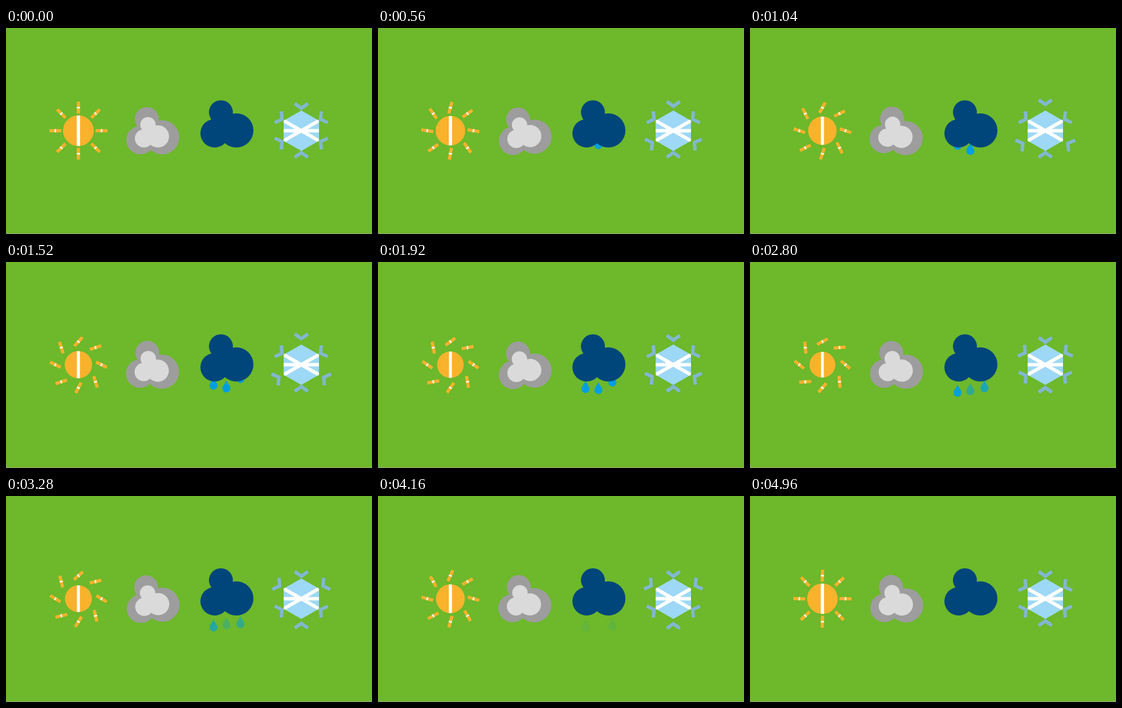
An HTML page that plays this animation: 642 px wide and 362 px high, repeating every 5.04 s.

```html
<!DOCTYPE html>
<html lang="en">
<head>
<meta charset="utf-8">
<title>Weather icons</title>
<style>
  html, body { margin: 0; width: 100%; height: 100%; overflow: hidden; background: #6db82b; }
  svg { display: block; width: 100%; height: 100%; }
</style>
</head>
<body>
<svg viewBox="0 0 642 362">
  <defs>
    <clipPath id="disc"><circle r="27"/></clipPath>
    <clipPath id="hex"><path d="M0-35.5 31-17.8V17.8L0 35.5-31 17.8V-17.8Z"/></clipPath>
    <g id="ray">
      <rect x="-2.75" y="-10.5" width="5.5" height="21" fill="#f9b22c"/>
      <rect x="-2.75" y="-1.3" width="5.5" height="2.6" fill="#fff"/>
    </g>
    <g id="cloud">
      <circle cx="377" cy="148" r="21"/>
      <circle cx="366" cy="185" r="25"/>
      <circle cx="404" cy="180" r="30"/>
    </g>
    <path id="drop" d="M0-21C2-16 7-11.5 7-7A7 7 0 0 1-7-7C-7-11.5-2-16 0-21Z" fill="#009fe0"/>
    <path id="chevron" d="M-11.5-47.2 0-39 11.5-47.2" fill="none" stroke="#82b7d0" stroke-width="6"/>
  </defs>

  <rect width="642" height="362" fill="#6db82b"/>
  <rect y="361" width="642" height="1" fill="#96a588"/>

  <g id="rays" transform="translate(127 180.5)"></g>
  <g id="sun">
    <circle r="27" fill="#f9b22c"/>
    <rect x="-2.9" y="-27" width="5.8" height="54" fill="#fff" clip-path="url(#disc)"/>
  </g>

  <g id="sway">
    <use href="#cloud" x="-130" y="12" fill="#9d9d9d"/>
    <g fill="#dadada">
      <circle cx="249" cy="170" r="13.5"/>
      <circle cx="242" cy="194" r="16"/>
      <circle cx="266.5" cy="190.5" r="19.5"/>
    </g>
  </g>

  <g id="rain"></g>
  <use href="#cloud" fill="#00467a"/>

  <g transform="translate(518 180.5)" clip-path="url(#hex)">
    <rect x="-31" y="-36" width="62" height="72" fill="#9dd8f6"/>
    <path d="M-35 0H35M-35-20 35 20M-35 20 35-20" stroke="#fff" stroke-width="6"/>
  </g>
  <g id="flake" transform="translate(518 180)"></g>
</svg>
<script>
const LOOP = 5040, HALF = LOOP / 2, SWAY = LOOP / 4, STEP = 80;
const $ = id => document.getElementById(id);

function add(parent, shape) {
  const el = document.createElementNS("http://www.w3.org/2000/svg", "use");
  el.setAttribute("href", "#" + shape);
  return $(parent).appendChild(el);
}
const addMany = (n, parent, shape) => Array.from({ length: n }, () => add(parent, shape));
const move = (el, value) => el.setAttribute("transform", value);

// How far t has come from a to b, kept within 0 and 1.
const progress = (t, a, b) => Math.min(1, Math.max(0, (t - a) / (b - a)));
// Rises 0 to 1 and falls back over one span: straight, or as a half sine.
const pingPong = u => u <= 0 || u >= 1 ? 0 : 1 - Math.abs(2 * u - 1);
const hump = (t, a, b) => Math.sin(Math.PI * progress(t, a, b));

const rays = addMany(8, "rays", "ray");
const chevrons = addMany(6, "flake", "chevron");
const drops = [
  { x: 364, floor: 238.2, fall: [720, 3920], fade: [2750, 4290] },
  { x: 386.5, floor: 234, fall: [170, 3000], fade: [1940, 3860] },
  { x: 411.3, floor: 237.5, fall: [1090, 5870], fade: [2270, 4400] }
].map(d => ({ ...d, el: add("rain", "drop") }));

function drawSun(t) {
  const swing = pingPong(t / LOOP);
  rays.forEach((el, i) => {
    const angle = i * 45, reach = 40.5 + 2 * (i % 2), turn = i ? 45 : 70;
    move(el, `rotate(${angle}) translate(0 ${-reach}) rotate(${turn * swing})`);
  });
  move($("sun"), `translate(127 180.5) scale(${1 - 0.18 * swing})`);
}

function drawCloud(t) {
  const u = t % SWAY / SWAY;
  const tilt = 3 * hump(u, 0, .3) - 4 * hump(u, .3, .72) + 5.3 * hump(u, .72, .95);
  move($("sway"), `rotate(${tilt} 257 182)`);
}

function drawRain(t) {
  for (const d of drops) {
    const left = (1 - progress(t, ...d.fall)) ** 3;
    move(d.el, `translate(${d.x} ${d.floor - 33 * left})`);
    d.el.setAttribute("opacity", 1 - progress(t, ...d.fade));
  }
}

// Alternate arms push outwards in the first and second half.
function drawFlake(t) {
  chevrons.forEach((el, i) => {
    const out = 8 * pingPong(t / HALF - i % 2);
    move(el, `rotate(${i * 60}) translate(0 ${-out})`);
  });
}

const start = performance.now();
function tick() {
  const now = (performance.now() - start) % LOOP;
  const t = Math.floor(now / STEP) * STEP;
  for (const draw of [drawSun, drawCloud, drawRain, drawFlake]) draw(t);
  requestAnimationFrame(tick);
}
tick();
</script>
</body>
</html>
```
